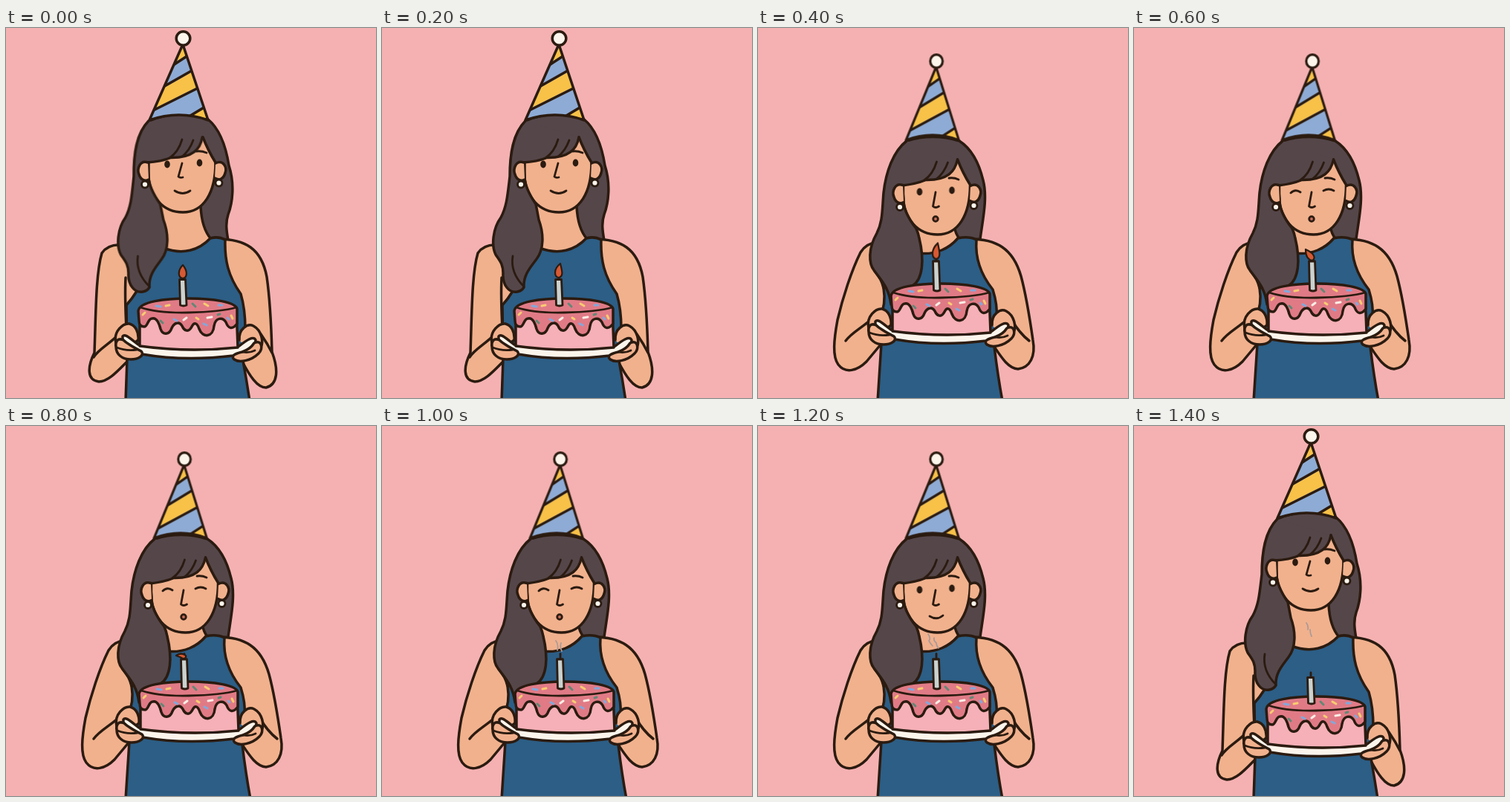
These frames come from a looping animation (498x498 px, 1600 ms). An HTML page:

```html
<!DOCTYPE html>
<html lang="en">
<head>
<meta charset="utf-8">
<title>Birthday cake</title>
<style>
html, body { margin: 0; width: 100%; height: 100%; overflow: hidden; background: #f5b1b2; }
svg { display: block; width: 100vw; height: 100vh; }
.ink { stroke: #2b1b10; stroke-width: 3.5; stroke-linecap: round; stroke-linejoin: round; fill: none; }
.skin { fill: #f1b18d; }
.hair { fill: #55464a; }
.dress { fill: #2c5e86; }
.white { fill: #fcf5ec; }
.dot { fill: #2b1b10; stroke: none; }
.yellow { fill: #f8c148; stroke: #f8c148; }
.blue { fill: #8eabd5; stroke: #8eabd5; }
.thin { stroke-width: 2.8; }
.fire { fill: #d65a34; stroke-width: 2.2; }
.smoke { stroke: #a99a98; stroke-width: 1.7; }

/* --n is the 200 ms step at which a part appears */
.s1, .s3, .s4, .s5 { animation: one 1.6s step-end infinite; animation-delay: calc((var(--n) - 8) * 200ms); }
.s3 { animation-name: three; }
.s4 { animation-name: four; }
.s5 { animation-name: five; }
@keyframes one { 0% { opacity: 1 } 12.5%, 100% { opacity: 0 } }
@keyframes three { 0% { opacity: 1 } 37.5%, 100% { opacity: 0 } }
@keyframes four { 0% { opacity: 1 } 50%, 100% { opacity: 0 } }
@keyframes five { 0% { opacity: 1 } 62.5%, 100% { opacity: 0 } }
.lock { transform-origin: 190px 200px; animation: sway 1.6s step-end infinite; }
@keyframes sway { 0% { transform: skewX(.8deg) } 12.5%, 100% { transform: none } }
</style>
</head>
<body>
<svg viewBox="0 0 498 498" preserveAspectRatio="none">
<defs>
  <clipPath id="cone"><path d="M238 22L193 124Q233 110 272 124Z"/></clipPath>

  <g id="hat" class="ink">
    <g clip-path="url(#cone)" stroke="none">
      <path class="yellow" d="M185 15H280V130H185Z"/>
      <path class="blue" d="M225 50L248 35L256 54L212 79Z"/>
      <path class="blue" d="M198 111L264 78L273 103L240 122L190 130Z"/>
      <path class="ink" d="M225 50L248 35M212 79L256 54M198 111L264 78M243 121L273 103"/>
    </g>
    <path d="M238 22L193 124Q233 110 272 124Z"/>
    <circle class="white" cx="238.5" cy="14" r="9.3"/>
  </g>

  <g id="face" class="ink">
    <path class="skin" d="M192 178L192 203C195 226 210 248 238 248C266 248 282 222 282 181Q272 165 265 147"/>
  </g>

  <g id="ears" class="ink">
    <path class="skin" d="M191 181C180 177 176 190 179 197C181 204 187 207 192 204"/>
    <path class="skin" d="M282 182C292 177 298 187 295 195C293 203 287 206 281 202"/>
    <g class="thin">
      <circle class="white" cx="187" cy="210.500" r="4.5"/>
      <circle class="white" cx="286.500" cy="208.500" r="4.5"/>
    </g>
  </g>

  <path id="strands" class="ink thin" d="M220 175Q232 167 237 150M237 173Q247 165 252 151"/>

  <g id="eyes"><ellipse class="dot" cx="217" cy="183.500" rx="3.8" ry="5"/><ellipse class="dot" cx="260.500" cy="181.500" rx="3.8" ry="5"/></g>

  <g id="cake" class="ink">
    <path class="skin" d="M148 424C144 408 158 397 166 398C174 400 179 409 178 420L165 430"/>
    <path class="skin" d="M314 420C313 405 325 397 333 401C344 407 347 422 343 430L325 432"/>
    <path class="white" d="M157 415C160 411 166 417 178 426Q245 438 314 428C324 420 333 414 336 420C337 427 322 437 306 441Q240 449 183 439C170 433 155 423 157 415Z"/>
    <path fill="#f6b0b7" d="M180 382L180 428Q245 437 312 430L310 378Z"/>
    <path fill="#e07b86" d="M178 381C179 368 215 364 245 364C280 364 309 369 311 378L311 398C304 407 299 404 296 396C292 389 282 389 280 401C279 416 265 418 260 405C257 396 253 396 250 402C246 410 240 408 237 401C233 394 226 397 223 404C220 413 211 414 208 405C205 394 201 390 197 391C191 390 191 402 186 402Q179 402 179 394Z"/>
    <path class="thin" d="M181 376Q205 384 245 383Q290 382 310 376"/>
    <g stroke-width="3">
      <path stroke="#f8cc70" d="M184 386l3-3M215 374l5-1M267 371l5 3M256 390l3 2M303 387l2 4"/>
      <path stroke="#83a8da" d="M202 374l6 1M286 373l5 0M226 392l4 2M266 398l4 2M298 390l2 2"/>
      <path stroke="#648775" d="M251 371l4 4M208 394l3 3M285 386l3-1"/>
      <path stroke="#fbeee5" d="M239 393l4-3M271 390l6-1"/>
    </g>
    <path class="skin" d="M158 420C149 416 147 424 148 429C148 439 156 446 168 446C179 446 187 440 182 435Q172 430 166 426Q161 423 158 420"/>
    <path class="thin" d="M149 430Q161 435 176 433"/>
    <path class="skin" d="M334 424C345 419 346 432 340 438C330 448 314 451 307 446C302 441 309 438 318 436Q329 432 334 424"/>
    <path class="thin" d="M318 436Q327 438 335 434"/>
  </g>

  <g id="candle" class="ink thin">
    <path d="M238 338V332"/>
    <path fill="#cbd2cf" d="M233.500 338.500H241.500L243 373Q239 375 234.500 373Z"/>
  </g>
  <path id="flame" class="ink fire" d="M238 319C231 326 231 336 238 337C245 336 244 326 238 319Z"/>
  <path id="flick" class="ink fire" d="M240 317C230 325 232 335 238 336C245 334 242 326 240 317Z"/>
</defs>

<rect width="498" height="498" fill="#f5b1b2"/>

<!-- upright -->
<g class="s3" style="--n:7">
  <g class="ink">
    <path class="hair" d="M193 125Q232 108 272 123C290 138 297 166 300 185C308 210 305 235 299 251C295 263 297 274 299 286L274 286L200 230Z"/>
    <path class="skin" d="M200 230L262 240C263 262 268 275 276 284L268 320L200 320"/>
    <path class="skin" d="M190 300C160 289 139 288 129 303C121 330 121 380 119 437C110 455 108 474 125 476C138 476 150 462 165 447L190 440V330"/>
    <path class="skin" d="M285 284C322 284 344 297 351 335C356 370 357 400 358 436C367 460 366 480 350 484C338 484 328 468 318 449L300 440V330"/>
    <path class="dress" d="M212 296C238 306 260 299 275 283Q286 280 295 285C294 312 299 334 316 358C321 375 322 390 322 405L319 448Q324 475 328 502L161 502L163 445L162 373C172 362 182 345 188 330Z"/>
    <path d="M161 336C160 355 161 385 162 405M150 414C138 426 125 432 118 443M343 412Q352 425 358 437"/>
  </g>
  <use href="#face"/>
  <g class="lock">
    <path class="ink hair" d="M193 125C176 142 172 170 172 200C169 225 168 240 160 255C149 270 147 293 153 305C159 314 163 318 163 330C162 346 171 357 182 355Q188 354 191 349C190 332 200 322 208 311C218 298 218 277 211 258Q209 247 207 237Q192 215 192 200L190 181C208 180 216 177 222 174.500C252 175 262 163 265 147"/>
    <path class="ink thin" d="M176 307C173 325 182 339 191 348"/>
  </g>
  <use href="#strands"/>
  <use href="#ears"/>
  <use href="#eyes"/>
  <path class="ink thin" d="M237 182L232 200Q234 202 238 201M256 166Q263 165 270 168M227 219Q238 226 248 219"/>
  <use href="#hat"/>
  <use href="#cake"/>
  <use href="#candle"/>
  <use href="#flame" class="s1" style="--n:0"/>
  <use href="#flick" class="s1" style="--n:1"/>
  <path class="ink smoke s1" style="--n:7" d="M232 265Q235 269 234 274M237 274Q237 279 239 283"/>
</g>

<!-- leaning in -->
<g class="s5" style="--n:2">
  <g class="ink">
    <path class="hair" d="M200 152Q235 141 271 152C288 163 298 184 303 205C309 228 303 255 299 284L272 286L205 262Z"/>
    <path class="skin" d="M205 260L264 266Q266 278 271 283L266 320L205 325"/>
    <path class="skin" d="M190 300C166 284 148 286 138 302C126 326 114 363 107 393C102 420 100 442 108 453C118 466 134 461 146 449L166 425L190 410V330"/>
    <path class="skin" d="M285 284C320 284 343 296 354 334C361 360 366 392 370 420C374 442 366 457 350 459C337 458 328 444 318 429L300 410V330"/>
    <path class="dress" d="M215 303C240 306 258 296 269 283Q284 280 294 285C292 310 300 332 316 352C321 368 322 380 321 390L318 429Q323 470 329 502L161 502L166 425L164 390C171 375 171 362 169 350L190 330Z"/>
    <path d="M157 327Q166 337 169 350M150 394C139 404 126 410 118 421M340 391Q352 411 365 421"/>
  </g>
  <use href="#face" transform="translate(3.500 30)"/>
  <path class="ink hair" d="M200 152C182 166 172 194 169 222C167 246 168 260 160 276C148 297 149 317 156 326C166 340 176 349 179 372C187 368 202 360 208 347C222 338 224 312 217 283Q216 277 213 270Q195 247 196 230L194 212C212 210 220 207 226 204.500C256 205 265 193 268.500 177"/>
  <use href="#strands" transform="translate(3.500 30)"/>
  <use href="#ears" transform="translate(4 30.500)"/>
  <path class="ink thin" d="M239 221L235.500 240Q239 243 243.500 240M257 202Q264 201 270 204"/>
  <use href="#eyes" class="s1" style="--n:2" transform="translate(.5 37)"/>
  <use href="#eyes" class="s1" style="--n:6" transform="translate(.5 37)"/>
  <path class="ink thin s3" style="--n:3" d="M211 222Q217 216 224 221M255 219Q262 215 269 219"/>
  <circle class="ink thin s4" style="--n:2; fill:#c86f5c" cx="239" cy="257" r="3.3"/>
  <path class="ink thin s1" style="--n:6" d="M231 256Q241 262 249 255"/>
  <use href="#hat" transform="matrix(.9 0 0 .965 25.500 31.200)"/>
  <use href="#cake" transform="translate(1 -20)"/>
  <g transform="matrix(1 0 0 1.130 2 -68.600)">
    <use href="#candle"/>
    <use href="#flick" class="s1" style="--n:2"/>
  </g>
  <path class="ink fire s1" style="--n:3" d="M231 298C231 306 234 312 240 313C245 310 243 303 231 298Z"/>
  <path class="ink fire s1" style="--n:4" d="M229 309Q236 304 242 309Q243 313 238 313Q235 311 229 309Z"/>
  <path class="ink smoke s1" style="--n:5" d="M234 289Q238 294 236 302M241 292Q239 297 242 303"/>
  <path class="ink smoke s1" style="--n:6" d="M229 280Q233 286 230 289Q232 293 235 296M237 285Q236 289 240 292Q240 296 243 299"/>
</g>
</svg>
</body>
</html>
```
